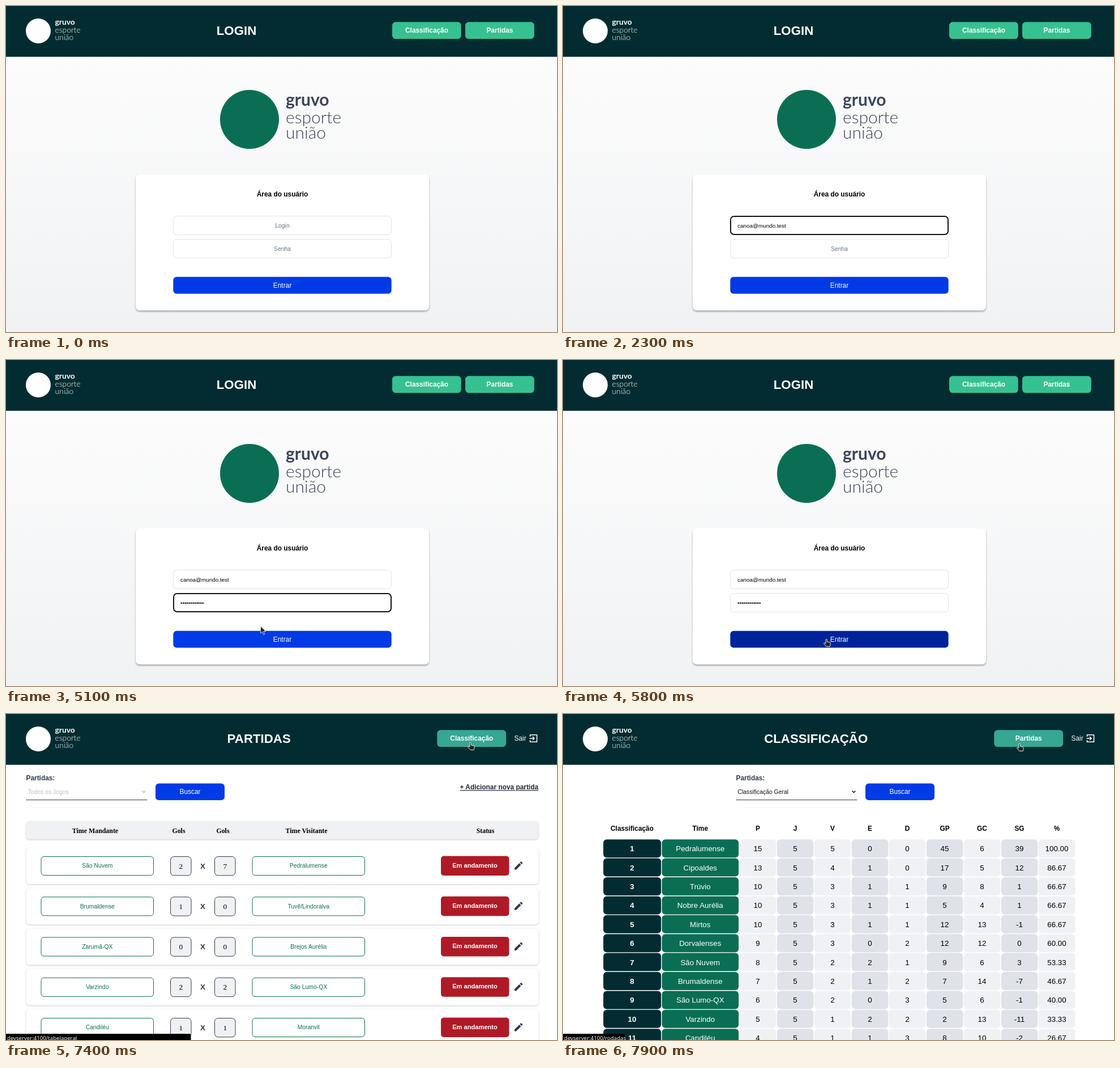
An HTML page for the animation above (8000 ms loop, 973 px wide and 575 px high).

```html
<!DOCTYPE html>
<html lang="pt-BR">
<head>
<meta charset="utf-8">
<title>Campeonato</title>
<style>
html, body { margin: 0; width: 100%; height: 100%; overflow: hidden; background: #fff; }
svg { display: block; width: 973px; height: 575px; }
text { font-family: "Liberation Sans", Arial, sans-serif; white-space: pre; }
.serif { font-family: "Liberation Serif", "Times New Roman", serif; }
.brand { font-family: Lato, sans-serif; }
.status { font-family: "Noto Sans", sans-serif; }
.b { font-weight: 700; }
.light { font-weight: 300; }
.link { text-decoration: underline; }
.card { filter: drop-shadow(0 2.5px 1.8px #0005); }
.row { filter: drop-shadow(0 1.5px 1.8px #0003); }
</style>
</head>
<body>
<svg id="stage" viewBox="0 0 973 575"></svg>
<script>
const DURATION = 8000, STEP = 100;
const DARK = '#022c31', GREEN = '#0a6e55', MINT = '#36c191', MINT_HOVER = '#36a793';
const BLUE = '#003be5', BLUE_HOVER = '#00239a', SLATE = '#2f3c4e', PALE = '#f0f1f5';
const EMAIL = 'canoa@mundo.test';

// Team, wins, draws, goals for, goals against; everyone has played 5
const STANDINGS = [
  ['Pedralumense', 5, 0, 45, 6], ['Cipoaldes', 4, 1, 17, 5], ['Trúvio', 3, 1, 9, 8],
  ['Nobre Aurélia', 3, 1, 5, 4], ['Mirtos', 3, 1, 12, 13], ['Dorvalenses', 3, 0, 12, 12],
  ['São Nuvem', 2, 2, 9, 6], ['Brumaldense', 2, 1, 7, 14], ['São Lumo-QX', 2, 0, 5, 6],
  ['Varzindo', 1, 2, 2, 13], ['Candiléu', 1, 1, 8, 10]
];
const MATCHES = [
  ['São Nuvem', 2, 7, 'Pedralumense'], ['Brumaldense', 1, 0, 'Tuvê/Lindoralva'],
  ['Zarumã-QX', 0, 0, 'Brejos Aurélia'], ['Varzindo', 2, 2, 'São Lumo-QX'],
  ['Candiléu', 1, 1, 'Moranvil']
];

// Pointer runs: [time, x, y] points; the pointer is hidden between runs
const RUNS = [
  { until: 2000, points: [[400, 648, 302], [600, 575, 370], [800, 506, 414], [1000, 540, 388],
    [1600, 540, 388], [1700, 610, 380], [1800, 735, 352], [1900, 883, 322]] },
  { until: 6400, points: [[4200, 438, 417.5], [4400, 436, 424], [4600, 440, 427], [4700, 440, 427],
    [5200, 452, 480], [5500, 464, 492]] },
  { until: DURATION, points: [[6400, 647, 437], [6500, 652, 428], [6600, 652, 428],
    [7100, 780, 175], [7300, 816, 54], [7500, 822, 46], [7700, 817, 44], [7800, 817, 44], [7900, 805, 52]] }
];
const POINTERS = {
  arrow: '<path d="M0 0v12.6l2.9-2.7 2.2 4.9 2.1-.9-2.2-4.8h4z" fill="#222" stroke="#fff" stroke-width=".8"/>',
  beam: ['#fff" stroke-width="2', '#333" stroke-width="1'].map(s =>
    `<path d="M-2.7-6.2Q0-6.2 0-4.8V4.8Q0 6.2-2.7 6.2M2.7-6.2Q0-6.2 0-4.8M0 4.8Q0 6.2 2.7 6.2" fill="none" stroke="${s}"/>`).join(''),
  hand: '<path d="M0 1.5a1.2 1.2 0 0 1 2.4 0V5l4.6 1q1.3.3 1.3 1.7 0 3-1.2 5.6H1L-3.2 8.6q-.6-1.8 1-1.6L0 8z" fill="#222" stroke="#fff" stroke-width=".9"/>'
};

const rect = (x, y, w, h, r, fill, extra = '') =>
  `<rect x="${x}" y="${y}" width="${w}" height="${h}" rx="${r}" fill="${fill}" ${extra}/>`;
const line = (d, color, width = 1) => `<path d="${d}" fill="none" stroke="${color}" stroke-width="${width}"/>`;
const circle = (x, y, r, fill) => `<circle cx="${x}" cy="${y}" r="${r}" fill="${fill}"/>`;
// y is the middle of the capital letters
const text = (x, y, size, str, fill = '#000', cls = '', anchor = 'middle') =>
  `<text x="${x}" y="${y + size * .36}" font-size="${size}" fill="${fill}" class="${cls}" text-anchor="${anchor}">${str}</text>`;

const navButton = (x, label, hover) =>
  rect(x, 28.2, 121.8, 29.7, 5.9, hover ? MINT_HOVER : MINT) + text(x + 61, 43, 11.88, label, '#fff', 'b');

function brand(x, baseline, scale, fill) {
  return ['gruvo', 'esporte', 'união'].map((word, i) =>
    text(x, (baseline + [0, 31, 58][i] * scale) - 30 * scale * .36, 30 * scale, word, fill,
      'brand ' + (i ? 'light' : 'b'), 'start')).join('');
}

const header = (x, title) => rect(0, 0, 973, 89.6, 0, DARK) + circle(57, 44, 22, '#fff') +
  brand(86.5, 33, .46, '#fff') + text(x, 43, 22.27, title, '#fff', 'b');

const exitLink = x => text(x, 43, 11.88, 'Sair', '#fff', '', 'start') +
  line(`M${x + 28} 40v-3.2h12v12.4h-12V46M${x + 27} 43h8.5m-3-3 3 3-3 3`, '#fff', 1.5);

function toolbar(x, label, color) {
  return text(x, 113, 11.88, 'Partidas:', SLATE, 'b', 'start') +
    text(x + 3, 137, 10.4, label, color, '', 'start') +
    line(`M${x + 205} 135.5l3 3 3-3`, color, 1.5) +
    line(`M${x} 151.5h214`, SLATE) +
    rect(x + 228.5, 122.5, 122, 29.6, 5.9, BLUE) + text(x + 289.5, 137, 11.88, 'Buscar', '#fff');
}

const loading = () => text(-1, 173.2, 11.88, 'Loading...', '#000', 'serif', 'start');

function field(y, placeholder, value, focused, caretX) {
  const frame = focused
    ? rect(296, y + 1, 384, 32, 6, '#fff', 'stroke="#101018" stroke-width="2"')
    : rect(295.5, y + .5, 385, 33, 6, '#fff', 'stroke="#dfe3e8"');
  return frame + (value ? text(308, y + 17, 9.9, value, '#000', '', 'start')
    : text(488, y + 17, 10.4, placeholder, '#66788a')) +
    (caretX ? rect(caretX, y + 11, 1, 12, 0, '#000') : '');
}

function loginPage(t, hover) {
  const within = (a, b) => t >= a && t < b;
  const caret1 = within(1200, 1700) ? 308 : within(1800, 2300) ? 393 : 0;
  const caret2 = within(4400, 4600) ? 308 : within(4600, 5100) ? 350 : 0;
  return '<linearGradient id="sky" x2="0" y2="1"><stop stop-color="#fcfcfc"/><stop offset="1" stop-color="#f0f2f4"/></linearGradient>' +
    rect(0, 89, 973, 486, 0, 'url(#sky)') + header(407, 'LOGIN') +
    navButton(682, 'Classificação') + navButton(811, 'Partidas') +
    circle(430, 200, 52, GREEN) + brand(494, 176, 1, '#3b4559') +
    rect(229, 297, 518, 240, 7, '#fff', 'class="card"') +
    text(488, 331.5, 11.88, 'Área do usuário', '#000', 'b') +
    field(370, 'Login', t >= 1800 && EMAIL, within(1200, 4200), caret1) +
    field(411, 'Senha', t >= 4600 && '•'.repeat(12), within(4400, 5800), caret2) +
    rect(295.3, 477.8, 385.4, 29.7, 5.9, BLUE) +
    (hover ? rect(296, 478.5, 384, 28.3, 5.2, BLUE_HOVER) : '') +
    text(488, 492.5, 11.88, 'Entrar', '#fff');
}

function matchRow([home, goals, against, away], i) {
  const y = 267.7 + i * 71.25;
  const team = (x, name) => rect(x, y - 16.2, 198.5, 33, 5, '#fff', `stroke="${GREEN}"`) +
    text(x + 99.3, y, 10.4, name, GREEN);
  const score = (x, n) => rect(x, y - 16.2, 36.5, 33.3, 6, PALE, `stroke="${SLATE}"`) +
    text(x + 18.3, y, 13.36, n, '#000', 'serif');
  return rect(35.5, y - 31.7, 905, 64, 6, '#fff', 'class="row"') +
    team(62, home) + score(290.5, goals) + text(347.5, y, 13.36, 'X', SLATE, 'b') +
    score(368.5, against) + team(435, away) +
    rect(768, y - 17.2, 120.5, 34.5, 5, '#b01a27') + text(828, y - 1, 11.14, 'Em andamento', '#fff', 'b') +
    `<path transform="translate(898 ${y - 7.5})" d="M0 14.2v-3L8.4 2.8l3 3L3 14.2zM9.3 1.9 10.8.4q.7-.7 1.4 0l1.7 1.7q.7.7 0 1.4l-1.5 1.4z" fill="${SLATE}"/>`;
}

function matchesPage(ready, hover) {
  const shift = ready ? 0 : 11;
  const heads = [[157.5, 'Time Mandante'], [305, 'Gols'], [383, 'Gols'], [530.5, 'Time Visitante'], [846.5, 'Status']];
  return header(446.7 + shift / 2, 'PARTIDAS') + navButton(761.3 + shift, 'Classificação', hover) +
    exitLink(897.5 + shift) + toolbar(35.5, 'Todos os Jogos', '#b9bfc7') +
    text(940 + shift, 129, 11.88, '+ Adicionar nova partida', '#1f2a38', 'b link', 'end') +
    (ready ? rect(35.5, 189, 905, 32, 6, PALE, 'class="row"') +
      heads.map(([x, s]) => text(x, 205.3, 11.88, s, '#000', 'serif b')).join('') +
      MATCHES.map(matchRow).join('') : loading());
}

function standingRow([team, wins, draws, scored, taken], i) {
  const y = 221.2 + i * 33.4, mid = y + 16.2, points = wins * 3 + draws;
  const cells = [points, 5, wins, draws, 5 - wins - draws, scored, taken, scored - taken, (points / 15 * 100).toFixed(2)];
  return rect(71.2, y, 102, 32, 6, DARK) + text(122, mid, 13.36, i + 1, '#fff', 'b') +
    rect(174.6, y, 135.6, 32, 6, GREEN) + text(242.3, mid, 13.36, team, '#fff') +
    cells.map((n, k) => rect(311.8 + k * 66, y, 64.6, 32, 6, k % 2 ? '#e0e2e9' : PALE) +
      text(344 + k * 66, mid, 13.36, n)).join('');
}

function standingsPage(ready) {
  const shift = ready ? 0 : 11;
  const heads = ['P', 'J', 'V', 'E', 'D', 'GP', 'GC', 'SG', '%'];
  return header(446.7 + shift / 2, 'CLASSIFICAÇÃO') + navButton(761.3 + shift, 'Partidas', true) +
    exitLink(897.5 + shift) + toolbar(305.5 + shift / 2, 'Classificação Geral', '#111') +
    (ready ? text(122, 201.5, 11.88, 'Classificação', '#000', 'b') + text(242.3, 201.5, 11.88, 'Time', '#000', 'b') +
      heads.map((s, k) => text(344 + k * 66, 201.5, 11.88, s, '#000', 'b')).join('') +
      STANDINGS.map(standingRow).join('') : loading());
}

const statusBar = (width, path) => rect(-4, 564, width + 4, 16, 3, '#000') +
  text(2, 571.5, 9.6, 'devserver:4100/' + path, '#f4f4f4', 'status', 'start');

function pointerAt(t) {
  const run = RUNS.find(r => t >= r.points[0][0] && t < r.until);
  if (!run) return null;
  const next = run.points.findIndex(p => p[0] > t);
  if (next < 0) return run.points.at(-1).slice(1);
  const [t0, x0, y0] = run.points[next - 1], [t1, x1, y1] = run.points[next];
  const f = (t - t0) / (t1 - t0);
  return [x0 + (x1 - x0) * f, y0 + (y1 - y0) * f];
}

function scene(t) {
  const pos = pointerAt(t), [x, y] = pos || [-99, -99];
  const inside = (l, top, r, bottom) => x > l && x < r && y > top && y < bottom;
  const login = t < 6100;
  const overSubmit = login && inside(295, 478, 681, 508);
  const overNav = !login && inside(761, 28, 883, 58);
  const overField = login && (inside(295, 370, 681, 404) || inside(295, 411, 681, 445));
  const page = login ? loginPage(t, overSubmit)
    : t < 7700 ? matchesPage(t >= 6400, overNav) : standingsPage(t >= 7900);
  const status = t >= 7900 ? statusBar(110, 'rodadas') : overNav ? statusBar(326.5, 'tabelageral') : '';
  const kind = overSubmit || overNav ? 'hand' : overField ? 'beam' : 'arrow';
  return page + status + (pos ? `<g transform="translate(${x} ${y})">${POINTERS[kind]}</g>` : '');
}

const stage = document.getElementById('stage');
let shown = -1;
function tick() {
  const t = Math.floor(performance.now() % DURATION / STEP) * STEP;
  if (t !== shown) stage.innerHTML = scene(shown = t);
  requestAnimationFrame(tick);
}
tick();
</script>
</body>
</html>
```
